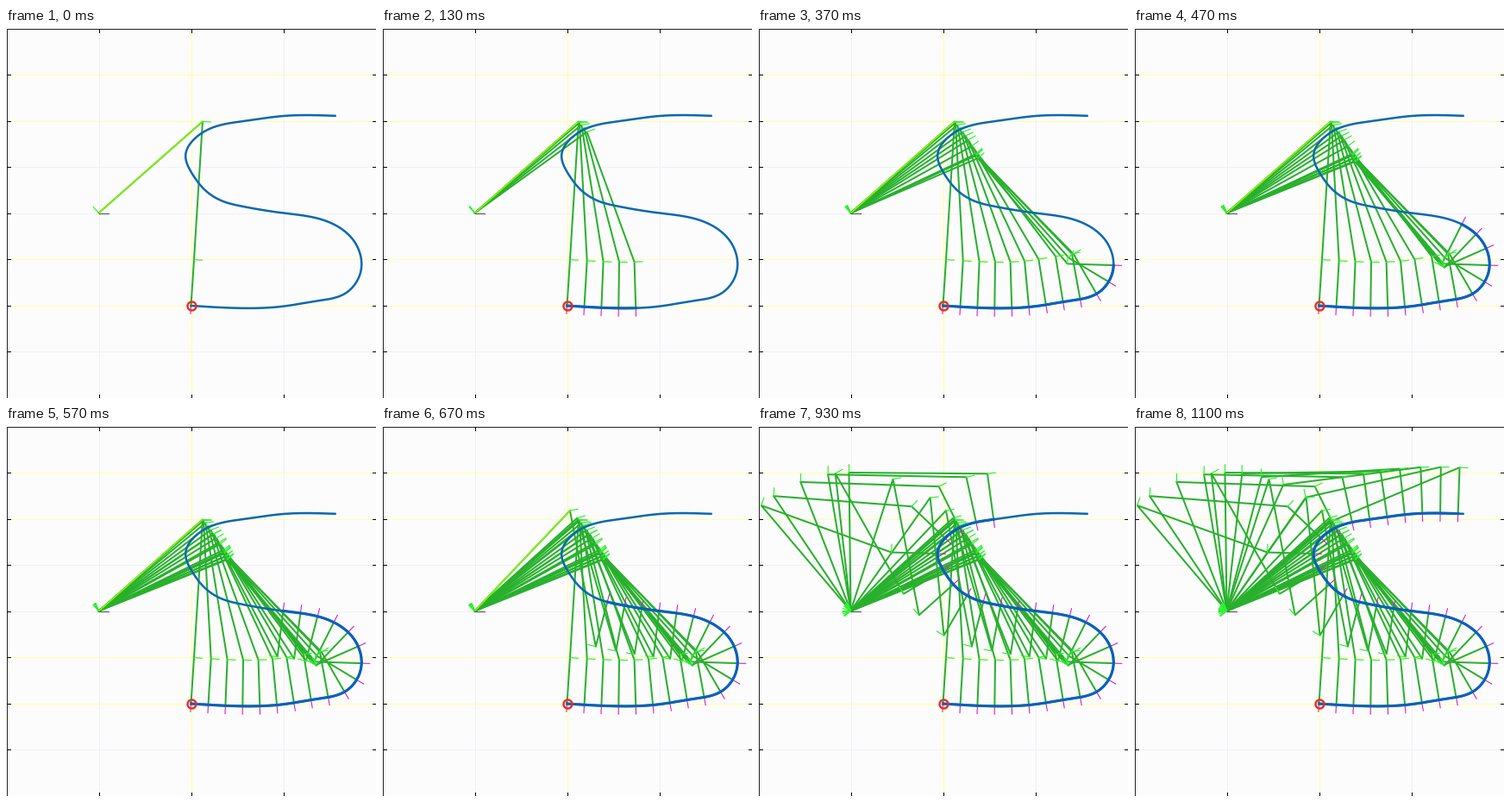
Write a matplotlib script that moves like this. It is 429 px wide and 429 px high and loops after 1.13 s.

```python
import numpy as np
import matplotlib.pyplot as plt
from matplotlib.animation import FuncAnimation
from matplotlib.collections import LineCollection

SIZE, DPI = 429, 100
PX = 72 / DPI                      # one pixel in points
UNIT = 53.5
BASE = np.array([107.0, 214.0])
UPPER = FORE = 3 * UNIT
HAND = UNIT
AXIS = 9.5
POSES = 34
TICKS = 113                        # 10 ms each

KNOTS = np.array([
    (214, 321.5), (270, 324.3), (321, 322.2), (360, 316), (394, 306.5),
    (411, 281), (404, 248), (375, 225), (321, 214), (272, 206),
    (250, 200), (232, 189), (216, 169.5), (207.7, 147), (227, 121),
    (275, 107.5), (321, 101.5), (381, 101.3)], float)


def natural_spline(points, samples=3000):
    """Cubic spline through the points, parametrised by chord length."""
    n = len(points)
    h = np.hypot(*np.diff(points, axis=0).T)
    slope = np.diff(points, axis=0) / h[:, None]
    system, rhs = np.eye(n), np.zeros((n, 2))
    for i in range(1, n - 1):
        system[i, i - 1:i + 2] = h[i - 1], 2 * (h[i - 1] + h[i]), h[i]
        rhs[i] = 6 * (slope[i] - slope[i - 1])
    bend = np.linalg.solve(system, rhs)
    knots = np.r_[0, np.cumsum(h)]
    s = np.linspace(0, knots[-1], samples)
    i = np.clip(np.searchsorted(knots, s, side="right") - 1, 0, n - 2)
    u, hi = (s - knots[i])[:, None], h[i][:, None]
    v = hi - u
    return ((bend[i] * v**3 + bend[i + 1] * u**3) / (6 * hi)
            + (points[i] / hi - bend[i] * hi / 6) * v
            + (points[i + 1] / hi - bend[i + 1] * hi / 6) * u)


def unit(v):
    return v / np.hypot(*v)


def side(d):
    """Left-hand perpendicular in screen coordinates."""
    return np.array([d[1], -d[0]])


def solve_arm(tip, normal):
    wrist = tip - HAND * normal
    reach = wrist - BASE
    height = np.sqrt(max(UPPER**2 - reach @ reach / 4, 0))
    elbow = BASE + reach / 2 + height * side(unit(reach))
    return np.array([BASE, elbow, wrist, tip])


path = natural_spline(KNOTS)
arc = np.r_[0, np.cumsum(np.hypot(*np.diff(path, axis=0).T))]
tangent = np.gradient(path, axis=0)
step = np.arange(POSES)
stops = np.searchsorted(arc, 19.87 * step + 0.012 * step**2)

arms, joint_axes, tool_axes = [], [], []
for j in stops:
    arm = solve_arm(path[j], -side(unit(tangent[j])))
    arms.append(arm)
    for a, b in zip(arm[:-1], arm[1:]):
        joint_axes.append([a, a + AXIS * side(unit(b - a))])
    tool_axes.append([arm[3], arm[3] + AXIS * unit(arm[3] - arm[2])])
lift = [np.arctan2(BASE[1] - a[1, 1], a[1, 0] - BASE[0]) for a in arms]

fig = plt.figure(figsize=(SIZE / DPI, SIZE / DPI), dpi=DPI, facecolor="#fcfcfd")
ax = fig.add_axes([0, 0, 1, 1])
ax.set(xlim=(-0.5, SIZE - 0.5), ylim=(SIZE - 0.5, -0.5))
ax.axis("off")


def line(xs, ys, color, width, **kw):
    return ax.plot(xs, ys, color=color, lw=width * PX, **kw)[0]


def strokes(color, width, z):
    return ax.add_collection(LineCollection(
        [], colors=color, linewidths=width * PX, zorder=z, capstyle="round"))


EDGE = SIZE - 1
YELLOW, PALE = "#ffffa4", "#f0f0f6"
for i in range(1, 8):
    y = int(i * UNIT)
    line([0, EDGE], [y, y], PALE if i in (3, 4, 7) else YELLOW, 1, zorder=1)
    for x in ([0, 4], [EDGE - 4, EDGE]):
        line(x, [y, y], "black", 1, zorder=3)
for x in (107, 214, 321):
    line([x, x], [0, EDGE], YELLOW if x == 214 else PALE, 1, zorder=1)
    for y in ([0, 4], [EDGE - 4, EDGE]):
        line([x, x], y, "black", 1, zorder=3)
line([0, EDGE, EDGE], [EDGE, EDGE, 0], "#b4b430", 1, zorder=2)
line([0, 0, EDGE], [EDGE, 0, 0], "#222222", 1, zorder=2)

links = strokes("#28b02c", 2, 3)
outer = strokes("#8cf400", 1.6, 4)
joints = strokes("#30f030", 1.2, 5)
tools = strokes("#d41cc8", 1.1, 5)
line([BASE[0], BASE[0] + 11], [BASE[1]] * 2, "#506050", 1.2, zorder=6)
line(*path.T, "#0a68b0", 2.5, zorder=7)
trace = line([], [], "#0a60bc", 3.1, zorder=8)
line([214], [321.5], "#0a60c4", 1, marker="o", ms=10 * PX, mfc="none",
     mec="#e8301c", mew=2.4 * PX, zorder=9)


def update(tick):
    last = int((tick + 0.5) * 0.3)
    count = last + 1
    links.set_segments(arms[:count])
    joints.set_segments(joint_axes[:3 * count])
    tools.set_segments(tool_axes[:count])
    top = int(np.argmax(lift[:count]))
    outer.set_segments([arms[top][:2]] if last <= 20 else [])
    trace.set_data(*path[:stops[last] + 1].T)
    return links, outer, joints, tools, trace


anim = FuncAnimation(fig, update, frames=TICKS, interval=10, repeat=True,
                     repeat_delay=0, blit=False)
plt.show()
```
